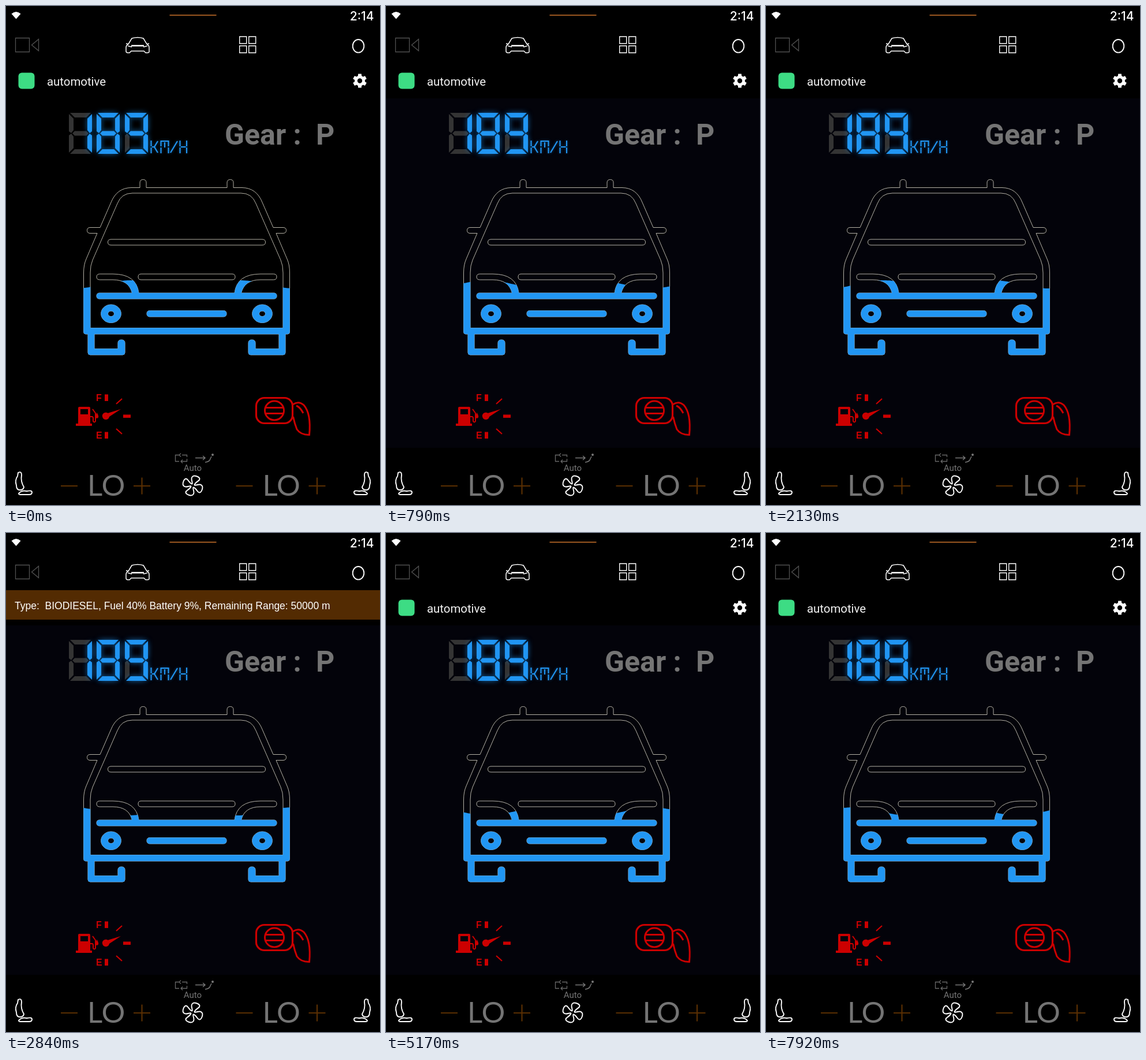
Animation, 648 px wide and 864 px high, one loop 8 s. Source, as an HTML page with a canvas:

```html
<!DOCTYPE html>
<html lang="en">
<head>
<meta charset="utf-8">
<title>Dashboard</title>
<style>
html, body { margin: 0; width: 100%; height: 100%; overflow: hidden; background: #000; }
canvas { display: block; width: 648px; height: 864px; }
</style>
</head>
<body>
<canvas id="stage" width="648" height="864"></canvas>
<script>
const ctx = document.getElementById('stage').getContext('2d');
const LOOP = 8000, AXIS = 313;
const BLUE = '#2196f3', RED = '#cc0000', GREY = '#747474', BROWN = '#5a2f02', WHITE = '#fff';

const clamp01 = v => Math.max(0, Math.min(1, v));
const ramp = (t, from, to) => clamp01((t - from) / (to - from));

function fill(shape, color, rule = 'nonzero') {
  ctx.fillStyle = color;
  ctx.fill(typeof shape === 'string' ? new Path2D(shape) : shape, rule);
}
function stroke(shape, color, width = 2) {
  ctx.strokeStyle = color;
  ctx.lineWidth = width;
  ctx.stroke(typeof shape === 'string' ? new Path2D(shape) : shape);
}
function rect(x, y, w, h, color) {
  ctx.fillStyle = color;
  ctx.fillRect(x, y, w, h);
}
function text(str, x, y, font, color, align = 'left') {
  ctx.font = font;
  ctx.fillStyle = color;
  ctx.textAlign = align;
  ctx.fillText(str, x, y);
}
function rounded(x, y, w, h, r) {
  const p = new Path2D();
  p.roundRect(x, y, w, h, r);
  return p;
}
function ellipse(x, y, rx, ry = rx) {
  const p = new Path2D();
  p.ellipse(x, y, rx, ry, 0, 0, Math.PI * 2);
  return p;
}
function mirrored(axis, draw) {
  draw();
  ctx.save();
  ctx.translate(axis * 2, 0);
  ctx.scale(-1, 1);
  draw();
  ctx.restore();
}

// Left half of the car; the right half is its mirror image.
const body = new Path2D(
  'M313 314.5H243V306Q243 300.5 237.5 300.5Q232 300.5 232 306V314.5H217Q192 315 182 340' +
  'L163 383.5H146Q140.5 383.5 140.5 388.5Q140.5 393.5 146 393.5H158L139 438Q134.5 448 134.5 462' +
  'V564Q134.5 568 138 568H142V600Q142 604 146 604H202Q206 604 206 600V583.5Q206 578 200 578' +
  'Q194 578 194 583.5V593.5H153V568H313' +
  'M313 324H219Q200 324 193 342L150 440Q146 449 146 462V557.5H313');
const bumper = new Path2D(
  'M313 497H230Q226 464 185 464H162.5Q157 464 157 469Q157 474 162.5 474H185' +
  'Q213 474 218.5 497H162Q157 497 157 502Q157 507 162 507H313');
const grille = new Path2D('M313 527.5H249.5Q244 527.5 244 532.8Q244 538 249.5 538H313');
const hood = new Path2D('M313 464H234Q229 464 229 469Q229 474 234 474H313');
const wipers = new Path2D('M313 404H182Q176.5 404 176.5 409Q176.5 414 182 414H313');
const lamp = ellipse(182, 532.8, 17.3, 15.7);
lamp.addPath(ellipse(182, 532.8, 5.5, 4.8));
const carParts = [body, bumper, grille, hood, wipers, lamp];

// Wave travel in wavelengths: [time, cycles]
const travel = [[0, 0], [790, .784], [2130, 1.942], [4090, 3.437], [5170, 4.29],
  [7000, 5.879], [7920, 6.663], [8000, 6.73]];

function cyclesAt(t) {
  const i = Math.max(1, travel.findIndex(k => k[0] > t));
  const [t0, c0] = travel[i - 1], [t1, c1] = travel[i];
  return c0 + (c1 - c0) * (t - t0) / (t1 - t0);
}

function drawCar(t) {
  const length = 190, crest = 120 + length * cyclesAt(t);
  mirrored(AXIS, () => carParts.forEach(p => stroke(p, '#c9c6b8', .9)));
  ctx.save();
  ctx.beginPath();
  ctx.moveTo(120, 620);
  for (let x = 120; x <= 506; x += 2) {
    ctx.lineTo(x, 482 + 7 * Math.cos(2 * Math.PI * (x - crest) / length));
  }
  ctx.lineTo(506, 620);
  ctx.clip();
  mirrored(AXIS, () => carParts.forEach(p => {
    fill(p, BLUE, 'evenodd');
    stroke(p, '#459fe9', .6);
  }));
  ctx.restore();
}

// Seven-segment display
const segments = {
  a: 'M2 0H38L30 8H10Z',
  b: 'M40 2V32L36 35L32 30V10Z',
  c: 'M40 69V39L36 36L32 41V61Z',
  d: 'M2 71H38L30 63H10Z',
  e: 'M0 69V39L4 36L8 41V61Z',
  f: 'M0 2V32L4 35L8 30V10Z',
  g: 'M6 35.5L10 31.5H30L34 35.5L30 39.5H10Z'
};

function drawDigit(x, lit) {
  ctx.save();
  ctx.translate(x, 185);
  for (const s in segments) if (!lit.includes(s)) fill(segments[s], '#343434');
  ctx.shadowColor = 'rgba(33, 150, 243, .65)';
  ctx.shadowBlur = 10;
  for (const s of lit) fill(segments[s], BLUE);
  ctx.restore();
}

function drawSpeed() {
  drawDigit(109, 'bc');
  drawDigit(157, 'abcdefg');
  drawDigit(206, 'abcdfg');
  ctx.save();
  ctx.shadowColor = 'rgba(33, 150, 243, .5)';
  ctx.shadowBlur = 4;
  stroke('M251.5 233V243M251.5 245V255M253 244H257L263 234M257 244L263 254' +
    'M268.5 255V245M268.5 243V234H281.5V243M281.5 245V255M275 236V245' +
    'M285 254L297 234M301.5 233V243M301.5 245V255M313 233V243M313 245V255M303 244H311.5', BLUE, 2.1);
  ctx.restore();
  text('Gear :', 379, 240, 'bold 50px Roboto, sans-serif', GREY);
  text('P', 537, 240, 'bold 50px Roboto, sans-serif', GREY);
}

function drawWarnings() {
  fill('M125 696Q125 694 127 694H144Q146 694 146 696V723H149V727H121V723H125Z' +
    'M129 698V707H142V698Z', RED, 'evenodd');
  stroke('M146 711H149Q151 711 151 714V719Q153 722 155 719V705L150 698', RED, 2);
  fill('M157.5 704Q163 713 157.5 714Q152 713 157.5 704Z', RED);
  fill(ellipse(173, 710, 6.2), RED);
  fill('M173 706L199 698L176 713Z', RED);
  rect(203, 707.5, 13, 5.5, RED);
  stroke('M191 689L201 680M191 732L201 741', RED, 2.2);
  [['F', 672.5], ['E', 737.5]].forEach(([letter, y]) => {
    text(letter, 156, y + 11.5, 'bold 16px "Liberation Sans", sans-serif', RED);
    rect(171, y, 6, 11.5, RED);
  });
  stroke(rounded(433.5, 678.5, 63, 44, 14), RED, 3.2);
  stroke(ellipse(465, 700.5, 16.5), RED, 3);
  stroke('M450 695.5H480M450 705.5H480', RED, 3);
  stroke('M497 690Q507 683 516 691Q529 706 525.5 742.5Q511 743 504 733Q500 723 497.5 711M503 692Q510 695 515 705', RED, 3);
}

function drawTopBar() {
  fill('M17.5 22.5L9.5 13.5Q17.5 6.5 25.5 13.5Z', WHITE);
  rect(283.5, 15, 81, 1.7, '#b46526');
  text('2:14', 637.5, 25, '500 21px Inter, sans-serif', WHITE, 'right');

  stroke('M16.5 55.5H40.5V79.5H16.5ZM44.5 67.5L56.5 57.5V77.5Z', '#505050', 1.3);

  stroke('M212 66L218 56Q228 53 238 56L244 66Q248 68 248 72V79Q248 81 245 81H242L239 78H217L214 81H211' +
    'Q208 81 208 78V72Q208 68 212 66ZM208 65L212 66M248 65L244 66', WHITE, 1.5);
  stroke('M211 69L218 71M245 69L238 71', WHITE, 1.5);
  rect(217, 67.5, 22, 2.5, WHITE);
  for (const x of [404.7, 420.7]) for (const y of [53, 69]) {
    stroke(rounded(x, y, 12, 12, 0), WHITE, 1.4);
  }
  stroke(ellipse(610.5, 69.3, 9.8, 11.3), WHITE, 1.8);
}

function drawCog(x, y) {
  const p = new Path2D();
  const tooth = [[-.36, 9], [-.23, 12.3], [.23, 12.3], [.36, 9]];
  for (let i = 0; i < 6; i++) {
    for (const [da, r] of tooth) {
      const a = Math.PI / 6 + i * Math.PI / 3 + da;
      p.lineTo(x + r * Math.cos(a), y + r * Math.sin(a));
    }
  }
  p.closePath();
  p.addPath(ellipse(x, y, 4.2));
  fill(p, WHITE, 'evenodd');
}

function drawHeader(t) {
  if (t >= 2790 && t < 4880) {
    rect(0, 99, 648, 51, '#532b02');
    text('Type:  BIODIESEL, Fuel 40% Battery 9%, Remaining Range: 50000 m', 15, 132,
      '17.5px "Liberation Sans", sans-serif', WHITE);
    return;
  }
  fill(rounded(21.5, 115.5, 28, 28, 6), '#3ddc84');
  text('automotive', 71, 138, '20.4px Roboto, sans-serif', '#f2f2f2');
  drawCog(613, 129.5);
}

function drawFan(x, y) {
  ctx.save();
  ctx.translate(x, y);
  ctx.rotate(.5);
  for (let i = 0; i < 4; i++) {
    ctx.rotate(Math.PI / 2);
    stroke('M-2 -2C-4 -7 -9 -8 -8 -13C-7 -18 3 -19 5 -16C7 -12 1 -10 2 -2', WHITE, 1.9);
  }
  ctx.restore();
}

function drawClimate() {
  mirrored(324, () => {
    stroke('M21 808Q27 805 27 812Q25 823 31 833Q30 838 24 838Q18 838 18 830Q15 821 20 814Z', WHITE, 1.9);
    stroke('M22 844Q27 838 36 840Q45 838 45 842Q45 846 40 846H25Q22 846 22 844Z', WHITE, 1.9);
  });
  for (const x of [0, 303.5]) {
    stroke(`M${95 + x} 831H${124 + x}M${221 + x} 831H${250 + x}M${235.5 + x} 816.5V845.5`, BROWN, 2.2);
    text('LO', 141 + x, 848, '51px Lato, sans-serif', GREY);
  }
  stroke('M300 777.5H293.5V788.5H300M305 777.5H313.5V781M313.5 784V788.5H303' +
    'M303 774.5L300 777.5L303 780.5M306 785.5L303 788.5L306 791.5', '#666', 1.3);
  stroke('M328 782.5H345M341 779L345 782.5L341 786M345 790Q353 789 354 784L356 780', '#777', 1.4);
  fill(ellipse(358, 777, 2), '#777');
  text('Auto', 323.5, 805, '15px Roboto, sans-serif', GREY, 'center');
  drawFan(323.5, 830.5);
}

function render(t) {
  rect(0, 0, 648, 864, '#000');
  ctx.save();
  ctx.globalAlpha = ramp(t, 0, 400);
  rect(0, 160, 648, 605, '#03030a');
  ctx.restore();
  drawTopBar();
  drawHeader(t);
  drawSpeed();
  drawCar(t);
  drawWarnings();
  drawClimate();
}

const start = performance.now();
function tick() {
  render((performance.now() - start) % LOOP);
  requestAnimationFrame(tick);
}
tick();
</script>
</body>
</html>
```
